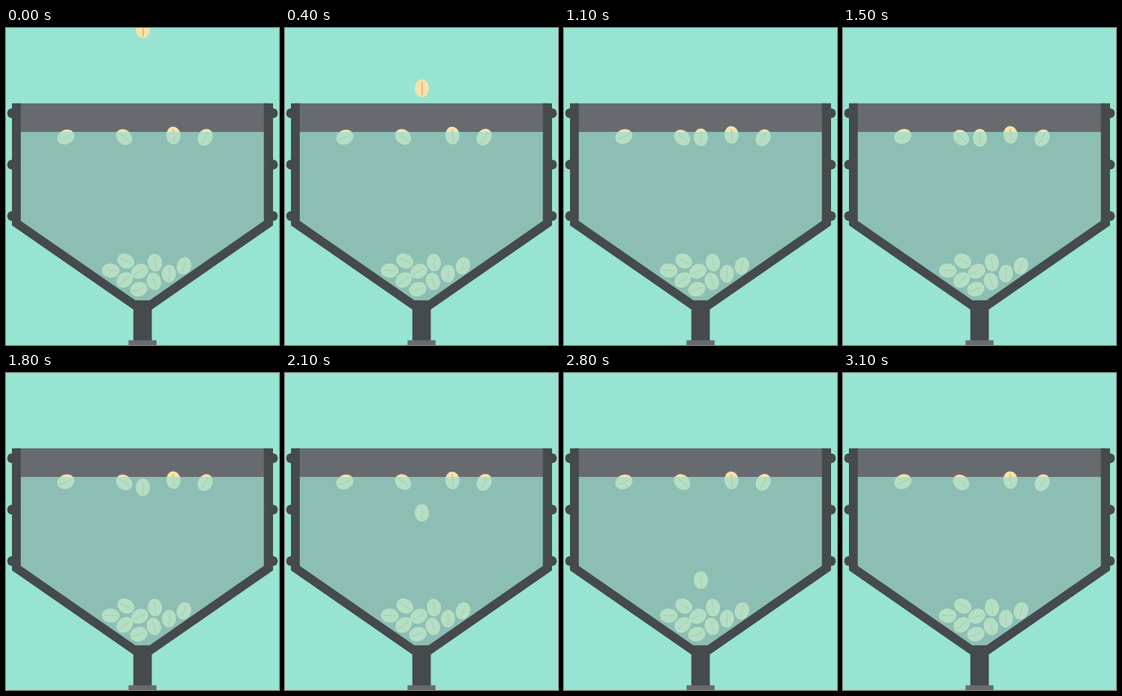
These frames come from a looping animation (366 px wide and 424 px high, 3.2 s). An HTML page:

```html
<!DOCTYPE html>
<html lang="en">
<head>
<meta charset="utf-8">
<title>Bean hopper</title>
<style>
  html, body { margin: 0; width: 100%; height: 100%; overflow: hidden; background: #97e4d2; }
  svg { display: block; width: 100vw; height: 100vh; }
</style>
</head>
<body>
<svg viewBox="0 0 366 424">
  <defs>
    <g id="bean">
      <ellipse rx="9.6" ry="11.8" fill="#f5e2ad"/>
      <path d="M-.8-8 Q.1-1 -.5 9.5 L1 9.5 Q1.6 1 .6-8Z" fill="#dfae70"/>
    </g>
  </defs>
  <path d="M14 100.7H352V262L193 368H173L14 262Z" fill="#676b6f"/>
  <g id="beans"></g>
  <path d="M14 139H352V262L193 368H173L14 262Z" fill="#9cdecf" fill-opacity=".72"/>
  <g id="frame" fill="#454a4c">
    <path d="M8 100.7H19.8V258L173.5 364.3H192.5L345.7 258V100.7H358V264L195.5 376.5V418H170.7V376.5L8 264Z"/>
  </g>
  <rect x="164.3" y="417.7" width="37.5" height="6.3" fill="#676b6f"/>
</svg>
<script>
const NS = 'http://www.w3.org/2000/svg';
const LOOP = 3200, STEP = 100, SETTLED = 3000;
const beans = document.getElementById('beans');
const frame = document.getElementById('frame');

function add(parent, tag, attrs) {
  const el = document.createElementNS(NS, tag);
  for (const key in attrs) el.setAttribute(key, attrs[key]);
  return parent.appendChild(el);
}

function place(el, x, y, angle = 0) {
  el.setAttribute('transform', `translate(${x} ${y}) rotate(${angle})`);
}

const addBean = () => add(beans, 'use', { href: '#bean' });

for (let i = 0; i < 3; i++)
  for (const x of [1.7, 352.3])
    add(frame, 'rect', { x, y: 107.5 + 68.75 * i, width: 12, height: 13, rx: 6 });

// The pile is a slanted lattice; each row lists the tilt of its beans.
const tilts = [[74, -18, 3, 18], [52, 64, -7], [-87, -62]];
tilts.forEach((row, r) => row.forEach((tilt, c) =>
  place(addBean(), 178 - 18.8 * r + 20.2 * c, 349.3 - 12.4 * r - (10.4 + 1.2 * r) * c, tilt)));

const floaters = [
  { x: 80.2, y: 145.5, tilt: 68 },
  { x: 158.4, y: 146.2, tilt: -48 },
  { x: 224.5, y: 143.4, tilt: -4 },
  { x: 267, y: 146.5, tilt: 30 }
].map(spec => ({ el: addBean(), ...spec }));
const dropper = addBean();

// Accelerates through the air, dips into the water, then sinks steadily.
function dropHeight(t) {
  const fall = 2 + .153 * t + .000109 * t * t;
  const dip = 6 * Math.exp(-(((t - 750) / 150) ** 2));
  const late = t - 1790;
  const sink = .0648 * (late + Math.hypot(late, 100));
  return Math.min(fall, 145.8 + dip + sink);
}

function draw(t) {
  const sway = .5 * Math.cos((t - 325) / 2100 * 2 * Math.PI);
  floaters.forEach(({ el, x, y, tilt }, i) =>
    place(el, x, y + (i % 2 ? -sway : sway), tilt));
  place(dropper, 183.5, dropHeight(t));
  dropper.setAttribute('visibility', t <= SETTLED ? 'visible' : 'hidden');
}

const start = performance.now();
function tick() {
  const t = (performance.now() - start) % LOOP;
  draw(Math.floor(t / STEP) * STEP);
  requestAnimationFrame(tick);
}
tick();
</script>
</body>
</html>
```
